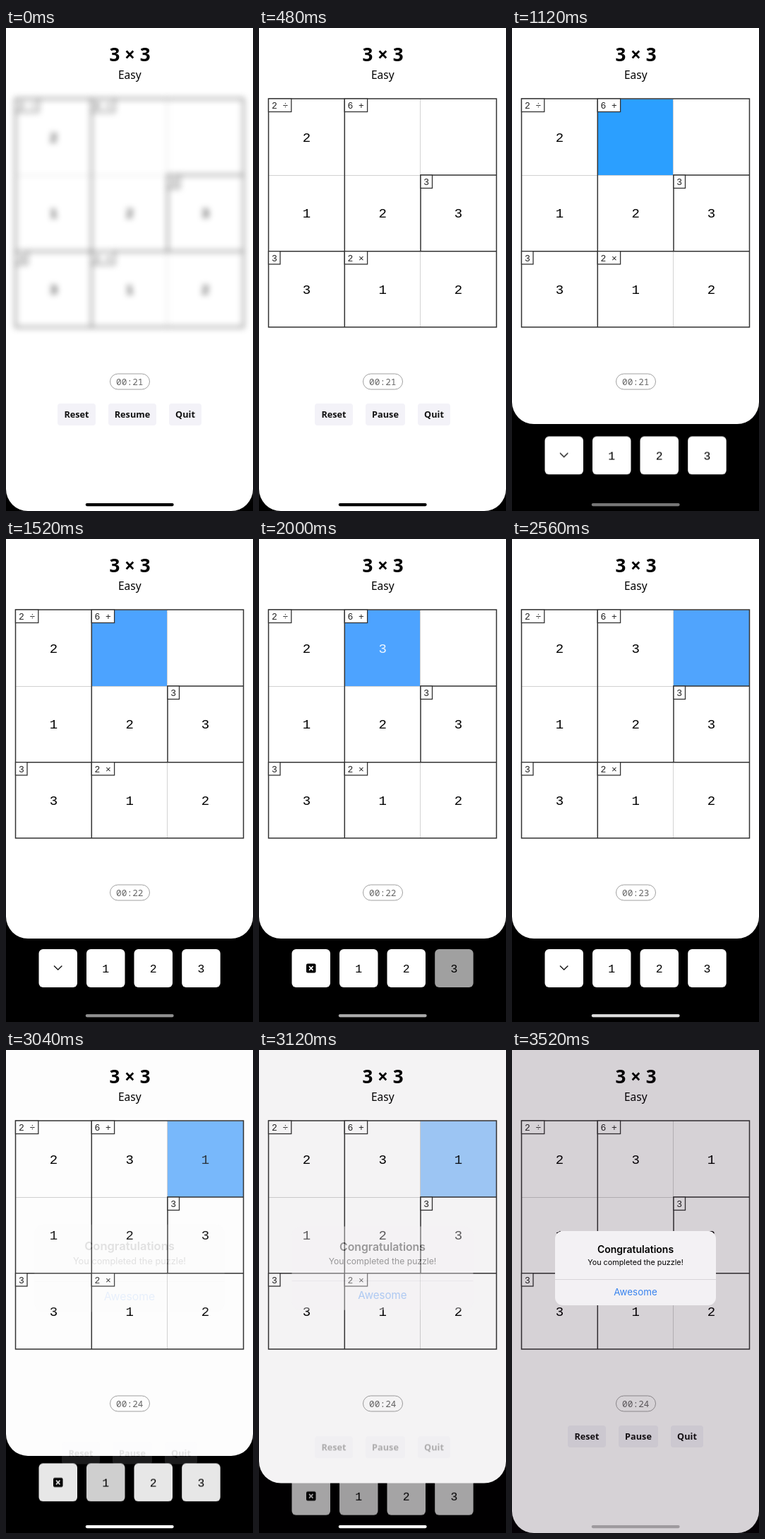
Write an HTML page that moves like this. It is 350 px wide and 683 px high and loops after 4.02 s.

```html
<!DOCTYPE html>
<html lang="en">
<head>
<meta charset="utf-8">
<title>3 × 3 puzzle</title>
<style>
  /* --d: how far the white sheet sits below its raised position */
  @property --d { syntax: "<length>"; inherits: true; initial-value: 118px; }

  html, body { margin: 0; width: 100%; height: 100%; overflow: hidden; background: #000; }
  svg { display: block; width: 350px; height: 683px; animation: slide var(--loop); }
  :root { --loop: 4020ms linear infinite; }
  text { text-anchor: middle; font-family: "Noto Sans", sans-serif; }

  .title { font-size: 26px; font-weight: 800; }
  .level { font-size: 15.5px; }
  .digit text { font: 19px "Liberation Mono", monospace; }
  .cage text { font: 13px "Liberation Mono", monospace; text-anchor: start; white-space: pre; fill: #222; }
  .cage rect { fill: #fff; }
  .cage rect, .thick { stroke: #333; stroke-width: 1.3; }
  .thick { fill: none; stroke-width: 1.5; }
  .thin { fill: none; stroke: #d2d2d2; }
  .clock rect { fill: none; stroke: #a0a0a0; }
  .clock text { font: 300 12.8px "Noto Sans Mono", monospace; fill: #666; }
  .buttons rect { fill: #f3f2f8; }
  .buttons text { font-size: 12.7px; font-weight: 600; fill: #111; }
  .keys rect { fill: #fff; }
  .keys text { font: 16.5px "Liberation Mono", monospace; }
  .alert text { font-family: Inter, sans-serif; }

  .sheet { fill: #fff; transform: translateY(var(--d)); }
  .keys { transform: translateY(calc(var(--d) / 2)); animation: keys var(--loop); }
  .buttons { transform: translateY(calc((118px - var(--d)) * .218)); animation: buttons var(--loop); }
  .board { animation: focus var(--loop); }
  .reset { animation: reset var(--loop); }
  .quit { animation: quit var(--loop); }
  .mid { animation: mid var(--loop); }
  .resume { animation: resume var(--loop); }
  .pause { animation: pause var(--loop); }
  .cell-a { animation: cell-a var(--loop); }
  .cell-b { fill: #50a4fd; animation: cell-b var(--loop); }
  .digit .val-a { animation: val-a var(--loop); }
  .digit .val-b { animation: val-b var(--loop); }
  .key-1 { animation: key-1 var(--loop); }
  .key-3 { animation: key-3 var(--loop); }
  .chevron { fill: none; stroke: #111; stroke-width: 1.3; animation: chevron var(--loop); }
  .erase { animation: erase var(--loop); }
  .s21 { animation: s21 var(--loop); }
  .s22 { animation: s22 var(--loop); }
  .s23 { animation: s23 var(--loop); }
  .s24 { animation: s24 var(--loop); }
  .dim { fill: rgb(30, 8, 30); animation: dim var(--loop); }
  .alert { transform-origin: 175px 308.5px; animation: alert var(--loop); }
  .home { animation: home var(--loop); }

  @keyframes slide {
    0%, 13% { --d: 118px; animation-timing-function: cubic-bezier(.35, .1, .3, 1); }
    27.5% { --d: -5px; animation-timing-function: linear; }
    28.5% { --d: -5px; animation-timing-function: ease-in-out; }
    37.8%, 73.4% { --d: 0px; animation-timing-function: ease-in; }
    75.8% { --d: 10px; animation-timing-function: cubic-bezier(.25, .4, .4, 1); }
    85.5%, 100% { --d: 118px; }
  }
  @keyframes keys {
    0%, 13% { opacity: 0; }
    20%, 73.4% { opacity: 1; }
    75.8% { opacity: .91; }
    83%, 100% { opacity: 0; }
  }
  @keyframes buttons {
    0%, 13% { opacity: 1; }
    19%, 73.4% { opacity: 0; }
    75.8% { opacity: .12; }
    84%, 100% { opacity: 1; }
  }
  @keyframes focus {
    0%, 1.2% { filter: blur(4.5px); }
    7.9%, 100% { filter: blur(0); }
  }
  @keyframes reset {
    0%, 1.2% { transform: translateX(-6px); animation-timing-function: ease-out; }
    7.9%, 100% { transform: none; }
  }
  @keyframes quit {
    0%, 1.2% { transform: translateX(6px); animation-timing-function: ease-out; }
    7.9%, 100% { transform: none; }
  }
  @keyframes mid {
    0%, 1.2% { x: 145px; width: 68px; animation-timing-function: ease-out; }
    7.9%, 100% { x: 151px; width: 56px; }
  }
  @keyframes resume { 0%, 1.2% { opacity: 1; } 6%, 100% { opacity: 0; } }
  @keyframes pause { 0%, 1.2% { opacity: 0; } 7.9%, 100% { opacity: 1; } }

  @keyframes cell-a {
    0%, 13% { opacity: 0; fill: #2b9fff; }
    18%, 29% { opacity: 1; fill: #2b9fff; }
    38%, 53.7% { opacity: 1; fill: #4da3ff; }
    61%, 100% { opacity: 0; fill: #4da3ff; }
  }
  @keyframes cell-b {
    0%, 53.7% { opacity: 0; }
    61%, 73.4% { opacity: 1; }
    75.8% { opacity: .75; }
    82%, 100% { opacity: 0; }
  }
  @keyframes val-a {
    0%, 45.7% { opacity: 0; fill: #fff; }
    49.5%, 53.7% { opacity: .9; fill: #fff; }
    60%, 100% { opacity: 1; fill: #000; }
  }
  @keyframes val-b {
    0%, 67.2% { opacity: 0; fill: #fff; }
    69.6%, 73.4% { opacity: .9; fill: #fff; }
    75.8% { opacity: 1; fill: #1c2630; }
    80%, 100% { opacity: 1; fill: #000; }
  }
  @keyframes key-1 {
    0%, 67.2% { opacity: 1; }
    69.6%, 73.4% { opacity: .63; }
    75.8% { opacity: .92; }
    79%, 100% { opacity: 1; }
  }
  @keyframes key-3 {
    0%, 44% { opacity: 1; }
    46%, 53.7% { opacity: .63; }
    61%, 100% { opacity: 1; }
  }
  @keyframes chevron {
    0%, 45.7% { opacity: 1; }
    49%, 53.7% { opacity: 0; }
    60%, 73.4% { opacity: 1; }
    75.5%, 100% { opacity: 0; }
  }
  @keyframes erase {
    0%, 45.7% { opacity: 0; }
    49%, 53.7% { opacity: 1; }
    60%, 73.4% { opacity: 0; }
    75.5%, 100% { opacity: 1; }
  }

  @keyframes s21 { 0%, 29.84% { opacity: 1; } 29.85%, 100% { opacity: 0; } }
  @keyframes s22 { 0%, 29.84% { opacity: 0; } 29.85%, 53.72% { opacity: 1; } 53.73%, 100% { opacity: 0; } }
  @keyframes s23 { 0%, 53.72% { opacity: 0; } 53.73%, 75.5% { opacity: 1; } 75.51%, 100% { opacity: 0; } }
  @keyframes s24 { 0%, 75.5% { opacity: 0; } 75.51%, 100% { opacity: 1; } }

  @keyframes dim {
    0%, 73.4% { opacity: 0; }
    75.8% { opacity: .01; }
    84%, 100% { opacity: .18; }
  }
  @keyframes alert {
    0%, 73.4% { opacity: 0; transform: scale(1.2); }
    75.8% { opacity: .12; transform: scale(1.18); animation-timing-function: ease-out; }
    85.5%, 100% { opacity: 1; transform: none; }
  }
  @keyframes home {
    0%, 14% { fill: #000; }
    28% { fill: #777; }
    50% { fill: #aaa; }
    64% { fill: #ddd; }
    75%, 77% { fill: #fff; }
    87%, 100% { fill: #9e9a9e; }
  }
</style>
</head>
<body>
<svg viewBox="0 0 350 683">
  <g class="keys">
    <rect x="46.5" y="580" width="54.5" height="54" rx="6"/>
    <path class="chevron" d="M68 603.5l5.7 5.5 5.7-5.5"/>
    <g class="erase">
      <path d="M69 600.5h9.5a2 2 0 0 1 2 2v9a2 2 0 0 1-2 2H69a2 2 0 0 1-2-2v-9a2 2 0 0 1 2-2z"/>
      <path d="M71 604.2l5.5 5.6m0-5.6l-5.5 5.6" stroke="#fff" stroke-width="1.7"/>
    </g>
    <g class="key-1"><rect x="114" y="580" width="54.5" height="54" rx="6"/><text x="141.2" y="612.5">1</text></g>
    <g><rect x="181.5" y="580" width="54.5" height="54" rx="6"/><text x="208.8" y="612.5">2</text></g>
    <g class="key-3"><rect x="249.2" y="580" width="54.5" height="54" rx="6"/><text x="276.5" y="612.5">3</text></g>
  </g>

  <rect class="sheet" y="-200" width="350" height="765" rx="31"/>

  <text class="title" x="175.5" y="47">3 × 3</text>
  <text class="level" x="175.3" y="71.5">Easy</text>

  <g class="board">
    <rect class="cell-a" x="121.5" y="100.5" width="107.5" height="107.5"/>
    <rect class="cell-b" x="229" y="100.5" width="107.5" height="107.5"/>
    <path class="thin" d="M13.5 208.5H229M228.5 100V208M228.5 316V423"/>
    <path class="thick" d="M13.5 100H336.5V423H13.5zM121.3 100V423M13.5 315.7H336.5M229 315.7V208H336.5"/>
    <g class="cage">
      <rect x="13.5" y="100" width="32.3" height="18.5"/><text x="18" y="114.3">2 ÷</text>
      <rect x="121.3" y="100" width="32.3" height="18.5"/><text x="125.5" y="114.3">6 +</text>
      <rect x="229" y="208" width="16.5" height="18.5"/><text x="233.2" y="222">3</text>
      <rect x="13.5" y="315.7" width="16.5" height="18.3"/><text x="18" y="329.7">3</text>
      <rect x="121.3" y="315.7" width="32.3" height="18.3"/><text x="125.5" y="329.7">2 ×</text>
    </g>
    <g class="digit">
      <text x="67.5" y="160.5">2</text>
      <text class="val-a" x="175.2" y="160.5">3</text>
      <text class="val-b" x="282.5" y="160.5">1</text>
      <text x="67.5" y="268.3">1</text>
      <text x="175.2" y="268.3">2</text>
      <text x="282.5" y="268.3">3</text>
      <text x="67.5" y="375.8">3</text>
      <text x="175.2" y="375.8">1</text>
      <text x="282.5" y="375.8">2</text>
    </g>
  </g>

  <g class="clock">
    <rect x="147.5" y="489" width="56" height="22" rx="11"/>
    <text class="s21" x="175.3" y="504.5">00:21</text>
    <text class="s22" x="175.3" y="504.5">00:22</text>
    <text class="s23" x="175.3" y="504.5">00:23</text>
    <text class="s24" x="175.3" y="504.5">00:24</text>
  </g>

  <g class="buttons">
    <g class="reset"><rect x="79" y="531" width="54" height="31" rx="4"/><text x="106" y="551">Reset</text></g>
    <rect class="mid" x="151" y="531" width="56" height="31" rx="4"/>
    <text class="resume" x="179" y="551">Resume</text>
    <text class="pause" x="179" y="551">Pause</text>
    <g class="quit"><rect x="225" y="531" width="46" height="31" rx="4"/><text x="248" y="551">Quit</text></g>
  </g>

  <rect class="dim" width="350" height="683"/>

  <g class="alert">
    <rect x="61" y="256" width="228" height="105" rx="11" fill="#f3f1f4"/>
    <path d="M61 324.5H289" stroke="#d8d5d9"/>
    <text x="175" y="286.7" font-size="14" font-weight="600">Congratulations</text>
    <text x="175" y="303.5" font-size="10.8">You completed the puzzle!</text>
    <text x="175" y="347.3" font-size="13.4" fill="#3a84ee">Awesome</text>
  </g>

  <rect class="home" x="112.7" y="672" width="125" height="4.2" rx="2.1"/>
</svg>
</body>
</html>
```
